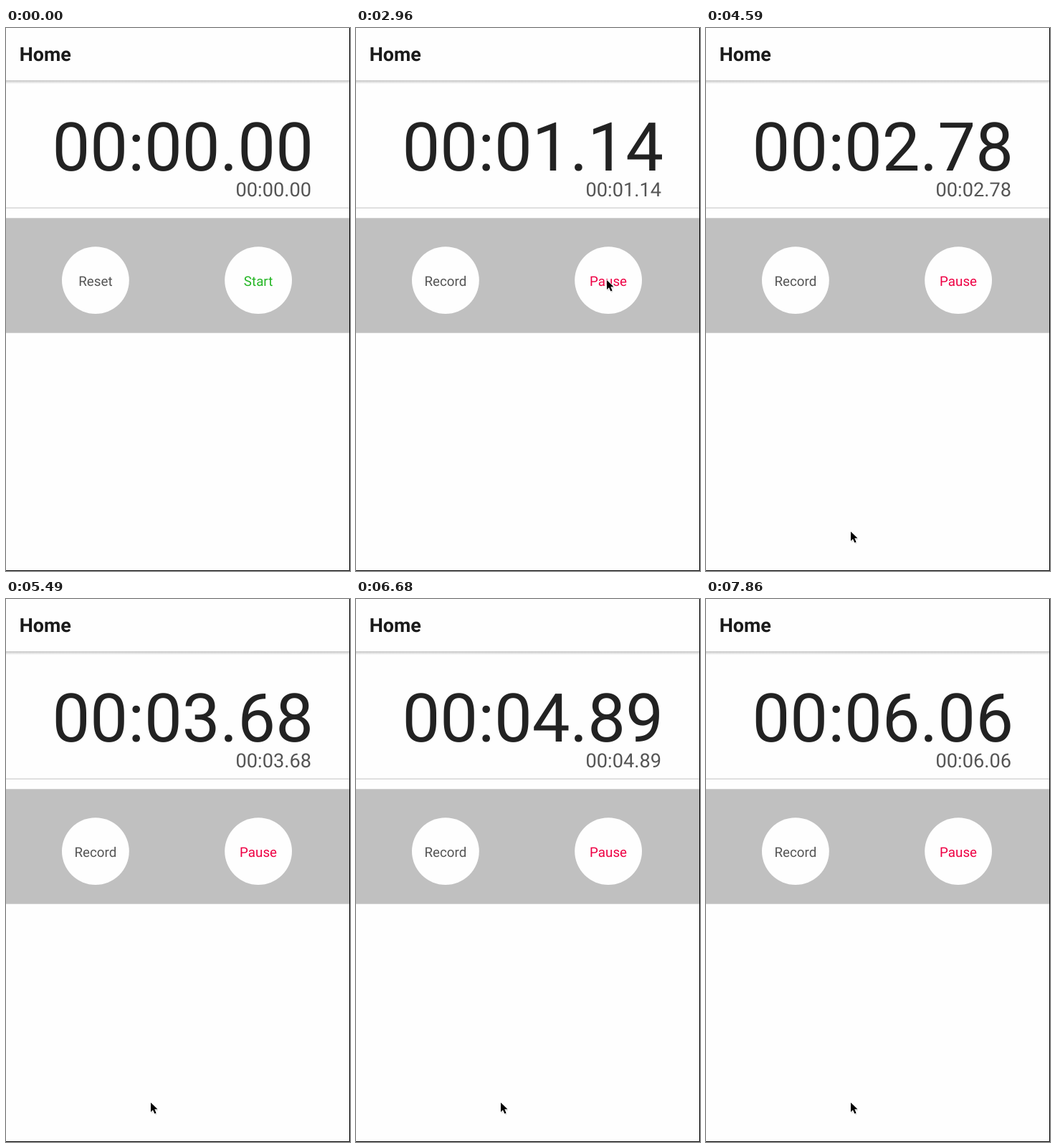
Write an HTML page that moves like this. It is 480 px wide and 758 px high and loops after 8000 ms.

```html
<!DOCTYPE html>
<html lang="en">
<head>
<meta charset="utf-8">
<title>Stopwatch</title>
<style>
  html, body { margin: 0; width: 100%; height: 100%; overflow: hidden; background: #fefefe; }
  svg { display: block; width: 480px; height: 758px; font-family: Roboto, sans-serif; text-rendering: geometricPrecision; }
  .label { font-size: 18.8px; text-anchor: middle; fill: #555; }
  .time { text-anchor: end; }
</style>
</head>
<body>
<svg viewBox="0 0 480 758">
  <defs>
    <linearGradient id="shadow" x2="0" y2="1">
      <stop stop-color="#c4c4c4"/>
      <stop offset="1" stop-color="#fefefe"/>
    </linearGradient>
  </defs>
  <rect width="480" height="758" fill="#fefefe"/>
  <rect y="73" width="480" height="5" fill="url(#shadow)"/>
  <text x="18.8" y="46.3" font-size="26.9" font-weight="700" fill="#1a1a1a">Home</text>

  <text id="total" class="time" x="429" y="199" font-size="94" fill="#222"></text>
  <text id="lap" class="time" x="426" y="235.3" font-size="27.2" fill="#555"></text>
  <rect y="250.5" width="480" height="1.3" fill="#d0d0d0"/>

  <rect y="265.3" width="480" height="160.4" fill="#c0c0c0"/>
  <circle cx="124.9" cy="352.1" r="46.9" fill="#fefefe"/>
  <circle id="toggle" cx="352.1" cy="352.1" r="46.9"/>
  <text id="leftLabel" class="label" x="124.9" y="359.7"></text>
  <text id="rightLabel" class="label" x="352.1" y="359.7"></text>

  <path d="M479.5 0V757.5H0" fill="none" stroke="#000"/>
  <g id="cursor">
    <path d="M1 2v13l3-2.8 2.4 5 2.2-1-2.3-5h4.2z" fill="#000" opacity=".15"/>
    <path d="M0 0v13l3-2.8 2.4 5.2 2.2-1-2.3-5.1h4.2z" fill="#000" stroke="#fff" stroke-width="1.4" paint-order="stroke"/>
  </g>
</svg>
<script>
const LOOP = 8000, STEP = 148.5, FIRST_STEP = 22.5, START = 13;

// Keys are [step, ...values].
const clockKeys = [[13, 10], [20, 114], [26, 203], [37, 368], [45, 489], [53, 606]];
const cursorKeys = [
  [1, 422, 742], [2, 330, 650], [3, 262, 570], [4, 238, 515], [5, 248, 474], [6, 320, 427],
  [7, 333, 378], [17, 333, 378], [20, 350, 352], [21, 350, 352], [22, 340, 400],
  [24, 228, 660], [25, 202, 703]
];

const $ = id => document.getElementById(id);
const pad = n => String(n).padStart(2, "0");

function interpolate(keys, step) {
  const next = keys.findIndex(key => key[0] > step);
  if (next < 0) return keys[keys.length - 1].slice(1);
  if (next === 0) return keys[0].slice(1);
  const a = keys[next - 1], b = keys[next];
  const part = (step - a[0]) / (b[0] - a[0]);
  return a.slice(1).map((value, i) => value + (b[i + 1] - value) * part);
}

function formatTime(hundredths) {
  const seconds = Math.floor(hundredths / 100);
  return `${pad(Math.floor(seconds / 60))}:${pad(seconds % 60)}.${pad(hundredths % 100)}`;
}

function draw(time) {
  // The screen refreshes in discrete steps.
  const step = Math.floor((time % LOOP + FIRST_STEP) / STEP);
  const running = step >= START;
  const pressed = step === START;

  const clock = formatTime(running ? Math.round(interpolate(clockKeys, step)[0]) : 0);
  $("total").textContent = clock;
  $("lap").textContent = clock;

  $("leftLabel").textContent = running ? "Record" : "Reset";
  $("rightLabel").textContent = running ? "Pause" : "Start";
  $("rightLabel").style.fill = !running ? "#25b625" : pressed ? "#f7005a" : "#ee0044";
  $("toggle").style.fill = pressed ? "#ececec" : "#fefefe";

  const [x, y] = interpolate(cursorKeys, step);
  $("cursor").setAttribute("transform", `translate(${x} ${y})`);
  $("cursor").style.display = step < 1 ? "none" : "";
}

const origin = performance.now();
function tick() {
  draw(performance.now() - origin);
  requestAnimationFrame(tick);
}
tick();
</script>
</body>
</html>
```
